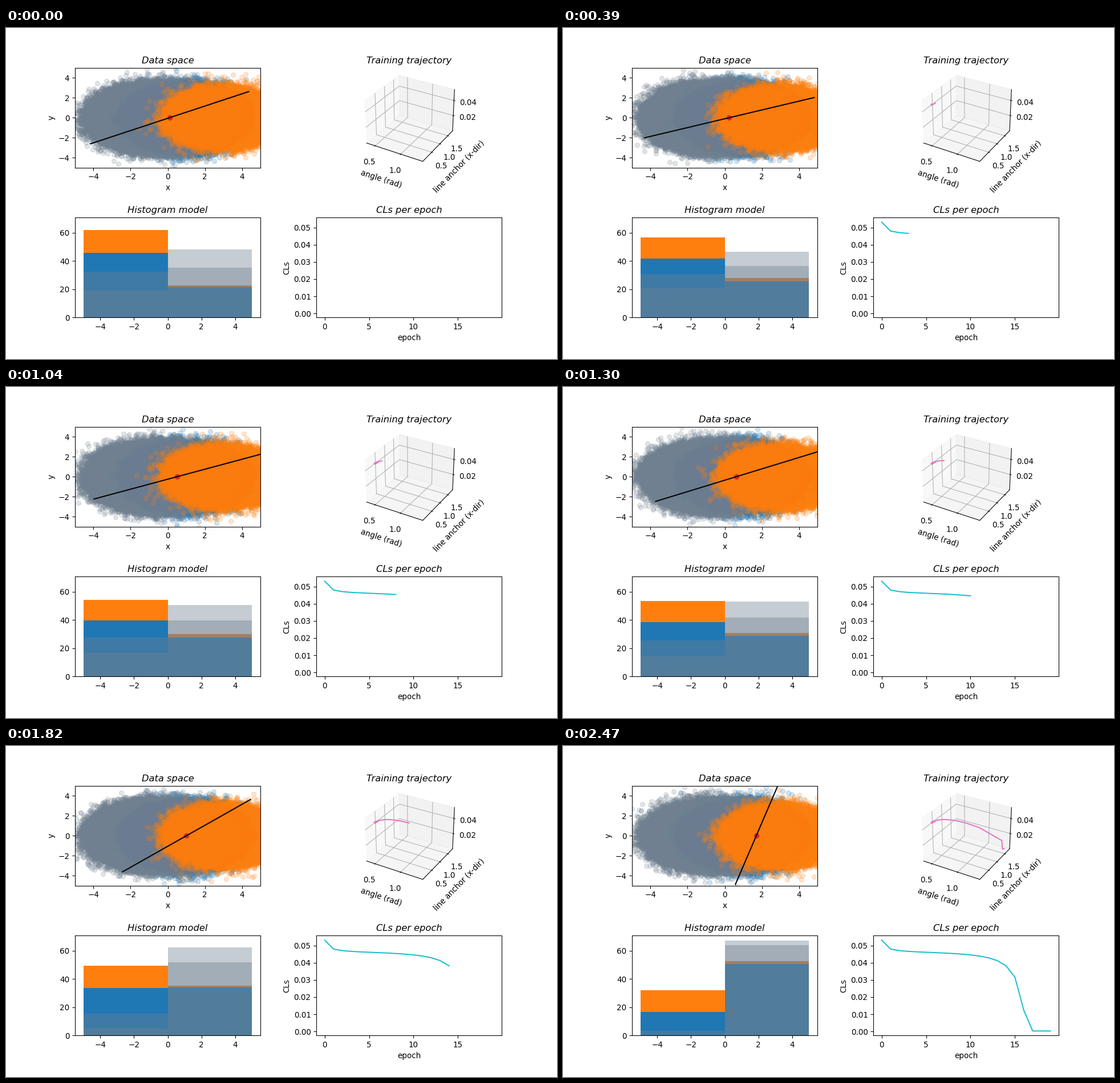
A matplotlib script for the animation above (2.6 s loop, 966 px wide and 580 px high).

```python
import math

import matplotlib.pyplot as plt
import numpy as np
from matplotlib.animation import FuncAnimation

EPOCHS = 20
N_SIG, N_BKG = 17.0, 67.45

# Training history: a slow start, then a runaway that stops at epoch 16
epoch = np.arange(EPOCHS)
t = np.minimum(epoch, 16)
creep = epoch - t


def surge(t, size, end):
    return size / (end - t) ** 2


angle = 0.33 + 0.17 * np.exp(-t / 1.3) + surge(t, 21.2, 20.65) + 0.011 * creep
anchor = 0.08 + 0.045 * t + surge(t, 7.5, 19) + 0.023 * creep
cls = 0.0463 + 0.0072 / (1 + 2.5 * epoch) - surge(epoch, 0.13, 17.95)
cls = np.maximum(cls, 0.0003)

# mean x, sample size, radius of the flattened core, colour
CLOUDS = [
    (1, 600_000, 3.05, "C0"),
    (0, 600_000, 3.05, "slategray"),
    (-1, 600_000, 3.05, "slategray"),
    (3, 150_000, 2.6, "C1"),
]


def cloud(rng, mean, size, core):
    """Unit Gaussian blob, thinned to constant density inside the core."""
    n_tail = int(size * math.exp(-core**2 / 2))
    n_core = int(n_tail * core**2 / 2)
    r = np.concatenate([
        core * np.sqrt(rng.random(n_core)),
        np.sqrt(core**2 - 2 * np.log(1 - rng.random(n_tail))),
    ])
    rng.shuffle(r)
    phi = rng.uniform(0, 2 * np.pi, r.size)
    return np.column_stack([mean + r * np.cos(phi), r * np.sin(phi)])


def yields(mean, total, i):
    """Expected counts on either side of the line."""
    z = (mean - anchor[i]) * math.sin(angle[i])
    left = total * 0.5 * (1 + math.erf(z / math.sqrt(2)))
    return np.array([left, total - left])


plt.rcParams["font.family"] = "DejaVu Sans"
plt.rcParams["font.size"] = 10.15

fig = plt.figure(figsize=(966 / 96, 580 / 96), dpi=96)
fig.subplots_adjust(left=0.125, right=0.9, top=0.88, bottom=0.125,
                    wspace=0.3, hspace=0.5)
ax_data = fig.add_subplot(221)
ax_traj = fig.add_subplot(222, projection="3d")
ax_hist = fig.add_subplot(223)
ax_cls = fig.add_subplot(224)
for ax, name in [(ax_data, "Data space"), (ax_traj, "Training trajectory"),
                 (ax_hist, "Histogram model"), (ax_cls, "CLs per epoch")]:
    # 3D axes lower their title, so the height is set afterwards
    ax.set_title(name, style="italic", y=1).set_y(1)

ax_data.set(xlim=(-5, 5), ylim=(-5, 5), xlabel="x", ylabel="y")
points = [ax_data.scatter([], [], color=c, alpha=0.2) for *_, c in CLOUDS]
line, = ax_data.plot([], [], color="black")
dot = ax_data.scatter([], [], color="C3")

ax_traj.set_xlim(0.331, 1.414, view_margin=0)
ax_traj.set_ylim(-0.017, 1.822, view_margin=0)
ax_traj.set_zlim(-0.0009, 0.0542, view_margin=0)
ax_traj.set_xticks([0.5, 1.0])
ax_traj.set_yticks([0.5, 1.0, 1.5])
ax_traj.set_zticks([0.02, 0.04])
ax_traj.set_xlabel("angle (rad)")
ax_traj.set_ylabel("line anchor (x-dir)")
path, = ax_traj.plot([], [], [], color="C6")

ax_hist.set(xlim=(-5.5, 5.5), ylim=(0, 70.7))


def bars(color, alpha=1.0):
    return ax_hist.bar([-2.5, 2.5], [0, 0], width=5, color=color, alpha=alpha)


bkg, sig = bars("C0"), bars("C1")
shifted = [bars("slategray", 0.4), bars("slategray", 0.4)]

ax_cls.set(xlim=(-0.95, 19.95), ylim=(-0.0024, 0.0557),
           xlabel="epoch", ylabel="CLs")
ax_cls.set_xticks([0, 5, 10, 15])
curve, = ax_cls.plot([], [], color="C9")


def set_bars(group, heights, base=(0, 0)):
    for bar, h, b in zip(group, heights, base):
        bar.set_height(h)
        bar.set_y(b)


def update(i):
    rng = np.random.default_rng(100 + i)
    for pts, (mean, size, core, _) in zip(points, CLOUDS):
        pts.set_offsets(cloud(rng, mean, size, core))

    dx, dy = 5 * math.cos(angle[i]), 5 * math.sin(angle[i])
    line.set_data([anchor[i] - dx, anchor[i] + dx], [-dy, dy])
    dot.set_offsets([[anchor[i], 0]])

    nominal = yields(1, N_BKG, i)
    set_bars(bkg, nominal)
    set_bars(sig, yields(3, N_SIG, i), nominal)
    for group, mean in zip(shifted, (0, -1)):
        set_bars(group, yields(mean, N_BKG, i))

    done = slice(0, i + 1)
    path.set_data_3d(angle[done], anchor[done], cls[done])
    curve.set_data(epoch[done], cls[done])
    return [*points, line, dot, path, curve]


anim = FuncAnimation(fig, update, frames=EPOCHS, interval=130, repeat=True)
plt.show()
```
